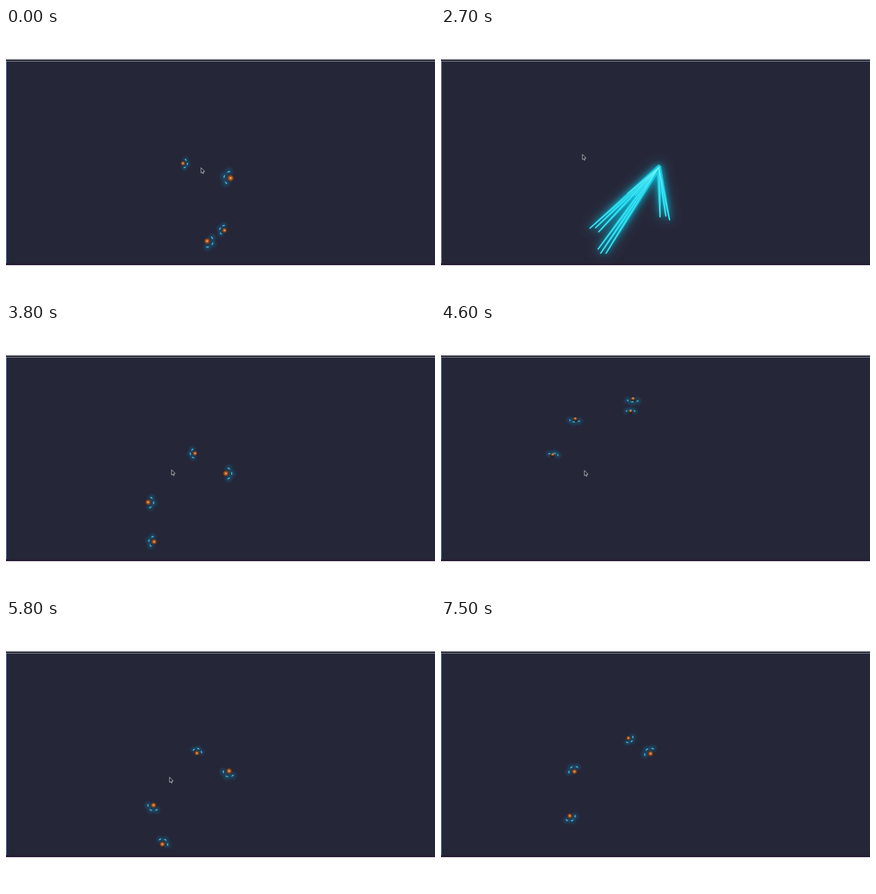
Recreate the animation shown at these times as an HTML page with a canvas. Size 640 px wide and 400 px high, loop 7600 ms.

```html
<!DOCTYPE html>
<html lang="en">
<head>
<meta charset="utf-8">
<title>Orbiting lights</title>
<style>
  html, body { margin: 0; width: 100%; height: 100%; overflow: hidden; background: #fff; }
  canvas { display: block; width: 640px; height: 400px; }
</style>
</head>
<body>
<canvas id="stage" width="640" height="400"></canvas>
<script>
const ctx = document.getElementById('stage').getContext('2d');
const LOOP = 7600, STEP = 100, TURN = 0.058, RAD = Math.PI / 180;
const RELOAD = 2400, BURST = 2600, READY = 3000;
const APEX = { x: 325, y: 208 };

// Four balls fixed in space; the camera glides from view to view.
const site = (x, y, z, reach) => ({ x, y, z, reach });
const view = (from, to, spin, tilt, scale, x, y) => ({ from, to, spin, tilt, scale, x, y });

const before = {
  phase: 197,
  sites: [site(-42, -59, -52, 6.7), site(29, -37, -76, 9.8), site(20, 41, 61, 7.3), site(-6, 57, 65, 9)],
  views: [view(0, 0, 0, 0, 1, 306, 261), view(0, 800, 2, 56, 0.65, 288, 239)]
};
const after = {
  phase: -217,
  sites: [site(21, -59, -11, 7), site(67, -29, -60, 8.7), site(-49, 14, 9, 8.3), site(-40, 73, 61, 8)],
  views: [
    view(0, 0, -7, -28, 0.96, 272, 292), view(2700, 3700, 0, 0, 1, 261, 252),
    view(3800, 4050, 52, 66, 0.82, 234, 146), view(4750, 5500, -4, 0, 1, 268, 259),
    view(5800, 7500, 16, 17, 0.92, 246, 224)
  ]
};
const cursorStops = [[0, 291, 209], [1300, 351, 291], [2700, 211, 189], [3800, 247, 218], [4600, 214, 219], [5800, 244, 235]];

const clamp = v => Math.min(1, Math.max(0, v));
const ease = p => p * p * (3 - 2 * p);
const mix = (a, b, p) => a + (b - a) * p;

function cameraAt(views, t) {
  return views.reduce((cam, next) => {
    const p = ease(clamp((t - next.from) / (next.to - next.from)));
    const mixed = {};
    for (const key in next) mixed[key] = mix(cam[key], next[key], p);
    return mixed;
  });
}

function orbsAt({ sites, views, phase }, t) {
  const cam = cameraAt(views, t);
  const c = Math.cos(cam.spin * RAD), s = Math.sin(cam.spin * RAD);
  const flat = Math.cos(cam.tilt * RAD), rise = Math.sin(cam.tilt * RAD);
  return sites.map(({ x, y, z, reach }, i) => ({
    x: cam.x + cam.scale * (x * c - y * s),
    y: cam.y + cam.scale * ((x * s + y * c) * flat + z * rise),
    heading: phase + TURN * t + cam.spin + (i % 3 ? 0 : 180) + 6 * (i - 1.5),
    radius: reach * cam.scale / 2,
    reach, flat
  }));
}

function around(orb, deg) {
  return {
    x: orb.x + orb.reach * Math.cos(deg * RAD),
    y: orb.y + orb.reach * orb.flat * Math.sin(deg * RAD)
  };
}

const lights = orb => [-60, 0, 60].map(d => orb.heading + d);

function drawPanel(reloading) {
  const band = (color, y, h, w = 640) => {
    ctx.fillStyle = color;
    ctx.fillRect(0, y, w, h);
  };
  band('#fff', 0, 400);
  band('#252739', 47, 307);
  band('#20202e', 47, 2);
  band('#898a96', 49, 1);
  band('#271d31', 351, 3);
  band(reloading ? '#9294a0' : '#5680d0', 50, 301, 1);
}

function glow(x, y, r, stops) {
  const g = ctx.createRadialGradient(x, y, 0, x, y, r);
  stops.forEach(([at, color]) => g.addColorStop(at, color));
  return g;
}

function drawHalo({ x, y }, r) {
  ctx.fillStyle = glow(x, y, r, [[0, 'rgba(20,125,170,.32)'], [1, 'rgba(20,125,170,0)']]);
  ctx.fillRect(x - r, y - r, r * 2, r * 2);
}

// Light comes from above the orbit plane, so a tilted ball shows a dark underside.
function drawBall({ x, y, radius, flat }) {
  const tilted = 1 - flat;
  ctx.fillStyle = glow(x, y - radius * tilted, radius * (1.35 - 0.25 * tilted), [
    [0, '#ffd9a0'], [0.22, '#cf7030'], [0.55, '#7d3d19'], [1, '#241918']
  ]);
  ctx.beginPath();
  ctx.arc(x, y, radius, 0, Math.PI * 2);
  ctx.fill();
}

function drawDash(orb, deg) {
  ctx.beginPath();
  for (let d = -9; d <= 9; d += 6) {
    const { x, y } = around(orb, deg + d);
    ctx.lineTo(x, y);
  }
  ctx.strokeStyle = '#50cfe8';
  ctx.lineWidth = 1.3;
  ctx.lineCap = 'round';
  ctx.shadowColor = '#12a8dc';
  ctx.shadowBlur = 6;
  ctx.stroke();
  ctx.shadowBlur = 0;
}

function drawOrb(orb) {
  const isBack = deg => Math.sin(deg * RAD) < 0;
  lights(orb).forEach(deg => drawHalo(around(orb, deg), orb.reach * 0.9));
  lights(orb).filter(isBack).forEach(deg => drawDash(orb, deg));
  drawBall(orb);
  lights(orb).filter(deg => !isBack(deg)).forEach(deg => drawDash(orb, deg));
}

// Trails stretch from the apex to each light, then their tails catch up.
function drawBurst(orbs, tail) {
  const wide = mix(3.4, 1, tail), thin = 1;
  const rays = new Path2D(), cores = new Path2D();
  for (const orb of orbs) {
    for (const deg of lights(orb)) {
      const end = around(orb, deg);
      const x = mix(APEX.x, end.x, tail), y = mix(APEX.y, end.y, tail);
      const angle = Math.atan2(end.y - y, end.x - x), quarter = Math.PI / 2;
      const ray = new Path2D();
      ray.arc(x, y, wide, angle + quarter, angle - quarter);
      ray.arc(end.x, end.y, thin, angle - quarter, angle + quarter);
      ray.closePath();
      rays.addPath(ray);
      cores.moveTo(x, y);
      cores.lineTo(end.x, end.y);
    }
  }
  ctx.shadowColor = '#08d4f4';
  ctx.fillStyle = 'rgba(30,215,235,.6)';
  for (const blur of [16, 8]) {
    ctx.shadowBlur = blur;
    ctx.fill(rays);
  }
  ctx.shadowBlur = 0;
  ctx.strokeStyle = 'rgba(110,250,255,.8)';
  ctx.lineWidth = 1;
  ctx.stroke(cores);
}

function drawCursor(t) {
  const last = cursorStops.length - 1;
  const i = Math.min(last, cursorStops.filter(stop => stop[0] <= t).length);
  const [t0, x0, y0] = cursorStops[i - 1], [t1, x1, y1] = cursorStops[i];
  const p = clamp((t - t0) / (t1 - t0));
  ctx.save();
  ctx.translate(mix(x0, x1, p), mix(y0, y1, p));
  const arrow = new Path2D('M0 0V7.4L1.6 6 2.8 8.4 4 7.8 2.9 5.4 5 5.2Z');
  ctx.fillStyle = '#14141c';
  ctx.fill(arrow);
  ctx.strokeStyle = '#d2d3da';
  ctx.lineWidth = 0.8;
  ctx.stroke(arrow);
  ctx.restore();
}

function draw(t) {
  drawPanel(t >= RELOAD && t < READY);
  if (t < RELOAD) orbsAt(before, t).forEach(drawOrb);
  else if (t >= READY) orbsAt(after, t).forEach(drawOrb);
  else if (t >= BURST) drawBurst(orbsAt(after, t), clamp((t - 2700) / 250));
  if (t < 6600) drawCursor(t);
}

const start = performance.now();
function tick() {
  const t = (performance.now() - start) % LOOP;
  draw(Math.floor(t / STEP) * STEP);
  requestAnimationFrame(tick);
}
tick();
</script>
</body>
</html>
```
